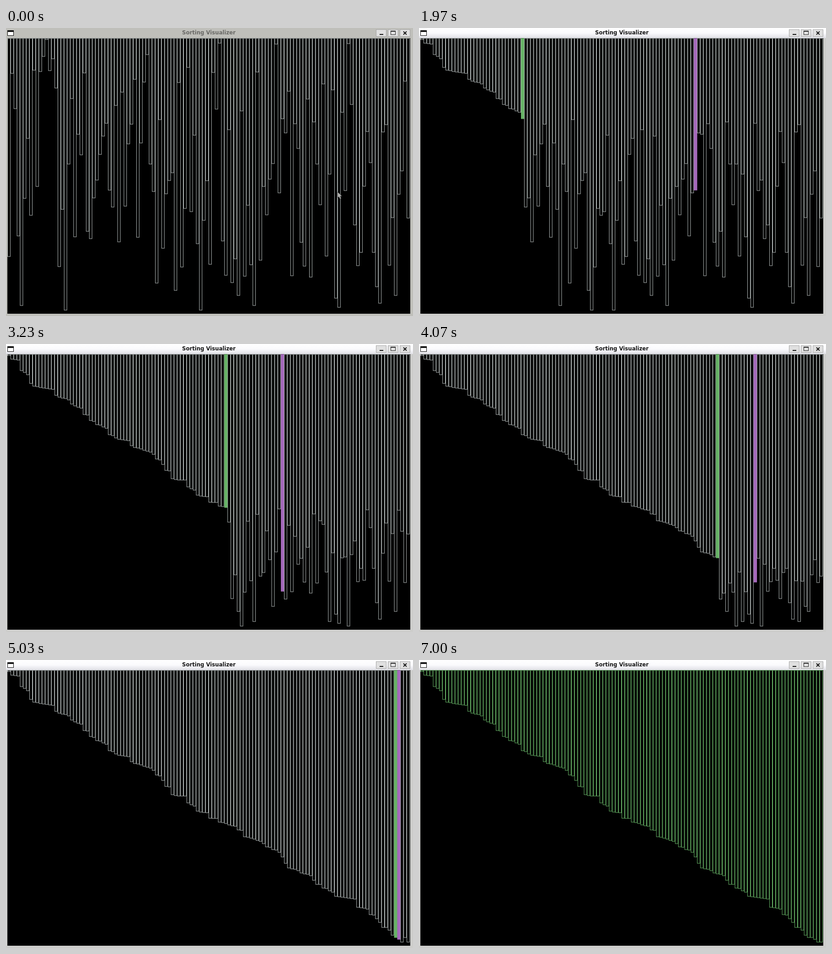
These frames come from a looping animation (890x629 px, 7.03 s). An HTML page with a canvas:

```html
<!DOCTYPE html>
<html lang="en">
<head>
<meta charset="utf-8">
<title>Sorting Visualizer</title>
<style>
  html, body { margin: 0; width: 100%; height: 100%; overflow: hidden; background: #c0c0bb; }
  canvas { display: block; }
</style>
</head>
<body>
<canvas id="stage" width="890" height="629"></canvas>
<script>
const ctx = document.getElementById('stage').getContext('2d');
const LOOP = 7030, FRAMES = 211;
const TOP = 22.3, LEFT = 3, PITCH = 6.875;
const GREEN = '#67b366', PURPLE = '#a569bb', GREY = '#b3bab9';
const SORT_START = 861, STEP = 33.9;
const FOCUS_AT = 400, POINTER_GONE = 1400;

// Bottom edge of each bar before sorting
const start = [
  499, 99, 176, 454, 606, 372, 241, 409, 92, 346, 95, 62, 25, 93, 67, 131,
  521, 396, 616, 297, 154, 456, 232, 277, 98, 444, 460, 371, 332, 276, 236, 208,
  354, 391, 169, 467, 140, 389, 253, 210, 112, 457, 251, 118, 58, 297, 357, 557,
  200, 481, 362, 333, 316, 573, 119, 522, 394, 86, 401, 234, 471, 616, 420, 333.5,
  516, 97, 177, 33, 465, 540, 222, 556, 504, 584, 181, 542, 387, 517, 606, 96,
  507, 346, 408, 330, 296, 35, 360, 198, 229, 138, 541, 209, 263, 468, 520, 155,
  544, 205, 297, 386, 122, 498, 319, 135, 590, 610, 184, 355, 34, 167, 430, 519,
  490, 345.5, 226, 294, 490, 565, 601, 227, 211, 518, 414, 584, 363, 312, 116, 415
];

// Selection sort, keeping the state after every swap
const states = [];
const work = start.slice();
for (let i = 0; i < work.length - 1; i++) {
  let min = i;
  for (let j = i + 1; j < work.length; j++) if (work[j] < work[min]) min = j;
  [work[i], work[min]] = [work[min], work[i]];
  states.push({ bars: work.slice(), min });
}

function box(x, y, w, h, fill) {
  ctx.fillStyle = fill;
  ctx.fillRect(x, y, w, h);
}

function line(color, width, ...points) {
  ctx.strokeStyle = color;
  ctx.lineWidth = width;
  ctx.beginPath();
  points.forEach(([x, y], k) => k ? ctx.lineTo(x, y) : ctx.moveTo(x, y));
  ctx.stroke();
}

function outline(x, y, w, h, color) {
  ctx.strokeStyle = color;
  ctx.lineWidth = 1;
  ctx.strokeRect(x + 0.5, y + 0.5, w - 1, h - 1);
}

function drawWindow(focused) {
  box(0, 0, 890, 629, focused ? '#cdcdcb' : '#bfbfba');
  if (focused) {
    const shade = ctx.createLinearGradient(0, 0, 0, 22);
    shade.addColorStop(0, '#ffffff');
    shade.addColorStop(0.5, '#fafafd');
    shade.addColorStop(1, '#e0e0e6');
    box(0, 0, 890, 22, shade);
  }
  box(3, 22, 881, 602, '#000');

  box(3, 5, 14, 12, '#000');
  box(4, 8.5, 12, 7.5, '#fff');

  ctx.font = 'bold 11.7px "DejaVu Sans", sans-serif';
  ctx.textAlign = 'center';
  ctx.fillStyle = focused ? '#151515' : '#696966';
  ctx.fillText('Sorting Visualizer', 443.5, 14);

  for (const x of [809, 835, 861]) {
    box(x, 3, 23, 16, '#e0e0e0');
    outline(x, 3, 23, 16, '#a4a4a4');
  }
  box(817, 13, 8, 2, '#111');
  outline(841, 6, 11, 9, '#222');
  box(841, 6, 11, 2, '#222');
  line('#111', 1.8, [869, 7.5], [876, 14.5]);
  line('#111', 1.8, [876, 7.5], [869, 14.5]);
}

function drawBars(time) {
  const step = Math.floor((time - SORT_START) / STEP);
  const done = step >= states.length;
  const { bars, min } = step < 0 ? { bars: start, min: -1 } : states[Math.min(step, states.length - 1)];
  bars.forEach((bottom, i) => {
    const x = LEFT + i * PITCH, h = bottom + 0.6 - TOP;
    if (!done && i === step) box(x, TOP, PITCH + 0.4, h, GREEN);
    else if (!done && i === min) box(x, TOP, PITCH + 0.4, h, PURPLE);
    else outline(x, TOP, PITCH, h, done ? GREEN : GREY);
  });
}

function drawPointer(time) {
  if (time >= POINTER_GONE) return;
  const k = Math.min(1, Math.max(0, (time - FOCUS_AT) / (1130 - FOCUS_AT)));
  const ease = k * k * (3 - 2 * k);
  ctx.save();
  ctx.translate(725 - 130 * ease, 358 - 4 * ease);
  ctx.beginPath();
  [[0, 0], [0, 13], [3, 10.5], [5.5, 15.5], [8, 14.5], [5.8, 9.5], [9.5, 9]]
    .forEach(([x, y]) => ctx.lineTo(x, y));
  ctx.closePath();
  ctx.fillStyle = '#b2b2b0';
  ctx.fill();
  ctx.strokeStyle = '#333';
  ctx.lineWidth = 0.8;
  ctx.stroke();
  ctx.restore();
}

function draw(now) {
  const frame = Math.floor((now % LOOP + 5) * FRAMES / LOOP) % FRAMES;
  const time = frame * 100 / 3;
  drawWindow(time >= FOCUS_AT);
  drawBars(time);
  drawPointer(time);
}

const begin = performance.now();
function tick() {
  draw(performance.now() - begin);
  requestAnimationFrame(tick);
}
tick();
</script>
</body>
</html>
```
